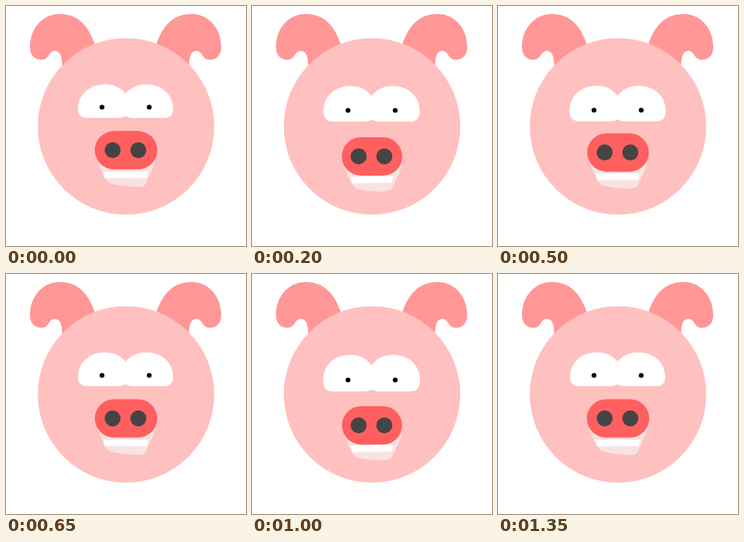
Animation of 300x300 px, one loop 1400 ms. Source, as an HTML page:

```html
<!DOCTYPE html>
<html>
<head>
<meta charset="utf-8">
<style>
html, body { margin: 0; width: 100%; height: 100%; overflow: hidden; background: #fff; }
svg { display: block; width: 300px; height: 300px; }
</style>
</head>
<body>
<svg viewBox="0 0 300 300">
  <defs>
    <path id="ear" fill="#ff9797" d="M30 51C30 29 45 10 67 10C92 10 104 27 111 48L100 90L70 80C71 64 68 56 61 56C53 56 54 69 42 67C34 66 30 60 30 51Z"/>
    <path id="eye" fill="#fff"/>
  </defs>
  <use href="#ear"/>
  <use href="#ear" transform="matrix(-1 0 0 1 299 0)"/>
  <circle cx="150" cy="150.5" r="110.3" fill="#ffc0c0"/>
  <use href="#eye"/>
  <use href="#eye" transform="matrix(-1 0 0 1 299 0)"/>
  <g id="pupils"><circle cx="120" r="3"/><circle cx="179" r="3"/></g>
  <path id="mouth" fill="#f7e3e2"/>
  <path id="teeth" fill="#fff"/>
  <rect id="snout" height="48" rx="24" fill="#ff5f5f"/>
  <g id="nostrils" fill="#444"><circle cx="133.3" r="10"/><circle cx="165.4" r="10"/></g>
</svg>
<script>
const PERIOD = 700;
const $ = id => document.getElementById(id);
const mix = (a, b, k) => a + (b - a) * k;

// Timing function of a cubic Bezier with y1 and y2 as in CSS
function bezier(x1, y1, x2, y2) {
  const at = (a, b, u) => 3 * a * u * (1 - u) ** 2 + 3 * b * u * u * (1 - u) + u ** 3;
  return x => {
    let lo = 0, hi = 1;
    for (let i = 0; i < 24; i++) {
      const mid = (lo + hi) / 2;
      if (at(x1, x2, mid) < x) lo = mid; else hi = mid;
    }
    return at(y1, y2, lo);
  };
}
const ease = bezier(.25, .1, .25, 1);
const easeInOut = bezier(.42, 0, .58, 1);

// There and back within one period
function swing(fn, t) {
  const p = ((t + PERIOD) % PERIOD) / PERIOD * 2;
  return p < 1 ? fn(p) : 1 - fn(p - 1);
}

function morph(a, b, k) {
  const target = b.match(/[\d.]+/g);
  let i = 0;
  return a.replace(/[\d.]+/g, n => mix(+n, +target[i++], k).toFixed(2));
}

const EYE = [
  'M150 110C143 101 133 98 124 98C104 98 90 111 90 129C90 136 94 140 102 140L139 140C146 140 148 138 150 137Z',
  'M150 115C144 106 135 101 123 101C102 101 89 115 89 132C89 142 92 147 102 147L139 147C146 147 148 145 150 144Z'
];
const MOUTH = [
  'M114 193L187 193C185 202 179 211 175 222Q173 227 162 226Q144 225 132 222C122 218 121 208 114 193Z',
  'M115 201L187 201C186 209 180 217 176 227Q173 233 162 233Q143 233 132 230C124 227 122 216 115 201Z'
];
const TEETH = [
  'M122 207L177 207L176 215L123 215Z',
  'M123 215L176 213.5L175 222L126 223Z'
];

function draw(now) {
  const t = now % (2 * PERIOD);
  const look = swing(easeInOut, t);
  const bob = swing(ease, t - 10);

  $('eye').setAttribute('d', morph(...EYE, look));
  $('pupils').setAttribute('transform', `translate(0 ${mix(126.5, 132.7, look)})`);

  $('mouth').setAttribute('d', morph(...MOUTH, bob));
  $('teeth').setAttribute('d', morph(...TEETH, bob));
  const width = mix(78, 75, bob);
  $('snout').setAttribute('x', 150 - width / 2);
  $('snout').setAttribute('y', mix(156.3, 165.4, bob));
  $('snout').setAttribute('width', width);
  $('nostrils').setAttribute('transform', `translate(0 ${mix(180.3, 189.3, bob)})`);
}

function loop() {
  draw(performance.now());
  requestAnimationFrame(loop);
}
loop();
</script>
</body>
</html>
```
